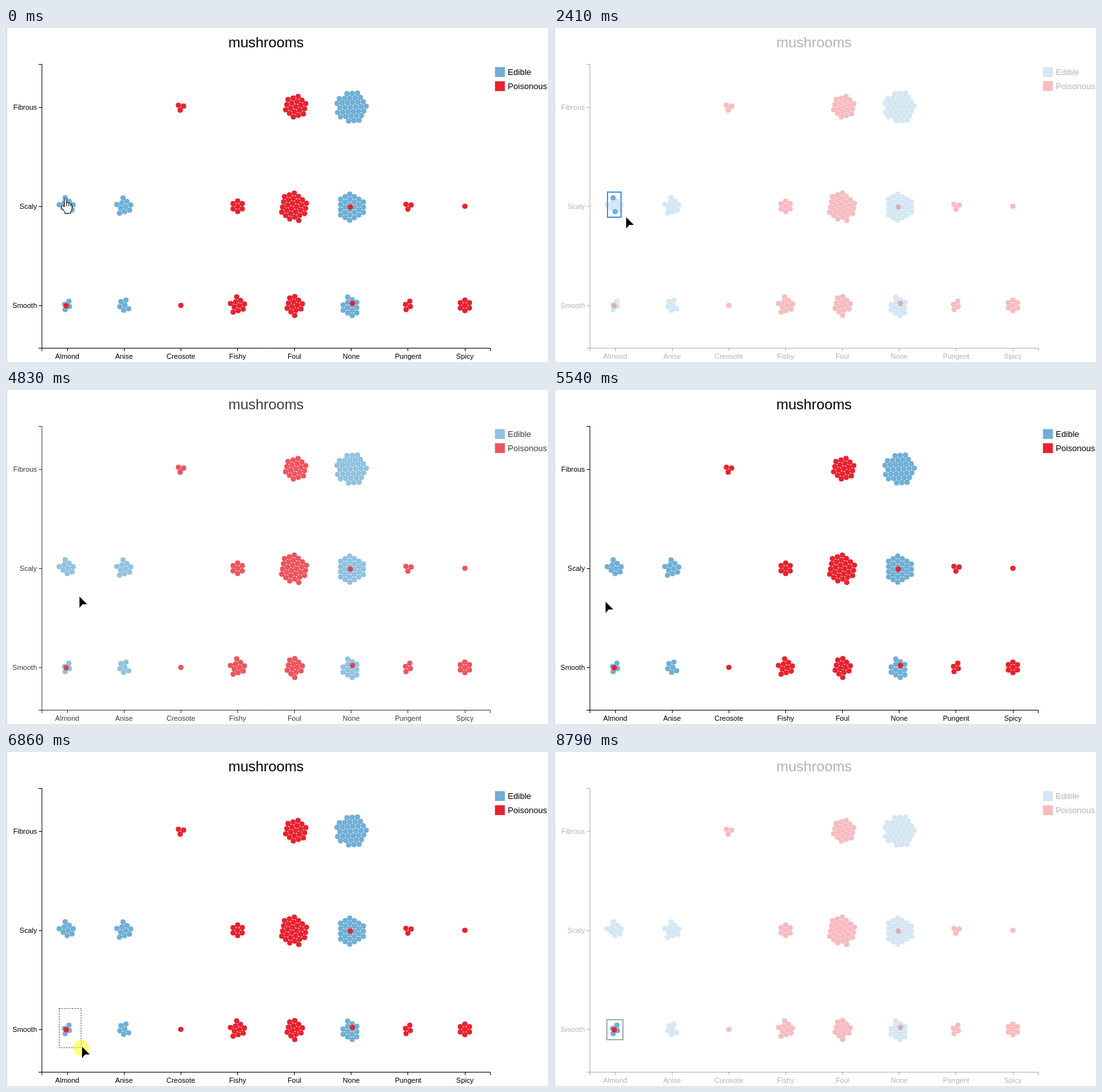
An HTML page with a canvas for the animation above (9270 ms loop, 841x519 px).

```html
<!DOCTYPE html>
<html lang="en">
<head>
<meta charset="utf-8">
<title>mushrooms</title>
<style>
html, body { margin: 0; width: 100%; height: 100%; overflow: hidden; background: #fff; }
canvas { display: block; }
</style>
</head>
<body>
<canvas id="stage" width="841" height="519"></canvas>
<script>
const c = document.getElementById('stage').getContext('2d');
const LOOP = 9270, STEP = 77, GAP = 8.15, PAD = 9, BLUE = '#70afd6', RED = '#e8222e';
const odors = ['Almond', 'Anise', 'Creosote', 'Fishy', 'Foul', 'None', 'Pungent', 'Spicy'];
const surfaces = ['Fibrous', 'Scaly', 'Smooth'];
const colX = i => 95 + 88.15 * i, rowY = i => 123 + 154 * i;
const dots = [];

// A tilted hexagonal lattice through (ox, oy), cut to the n points nearest the cell's centre.
function cluster(odor, surface, color, n = 1, ox = 0, oy = 0, tilt = 0) {
  const x0 = colX(odors.indexOf(odor)), y0 = rowY(surfaces.indexOf(surface));
  const a = tilt * Math.PI / 180, b = a + Math.PI / 3, points = [];
  for (let i = -6; i <= 6; i++)
    for (let j = -6; j <= 6; j++) {
      const x = ox + GAP * (i * Math.cos(a) + j * Math.cos(b));
      const y = oy + GAP * (i * Math.sin(a) + j * Math.sin(b));
      points.push({ x: x0 + x, y: y0 + y, color, d: x * x + .85 * y * y });
    }
  const found = points.sort((p, q) => p.d - q.d).slice(0, n);
  dots.push(...found);
  return found;
}

cluster('Creosote', 'Fibrous', RED, 3, -3.8, -3, 10);
cluster('Foul', 'Fibrous', RED, 19, 1.9, -.7, -17);
cluster('None', 'Fibrous', BLUE, 34, -1.3, 0, -3.5);

const scalyAlmond = cluster('Almond', 'Scaly', BLUE, 9, 1.4, .3, -19);
cluster('Anise', 'Scaly', BLUE, 10, 2.6, .5, -17);
cluster('Fishy', 'Scaly', RED, 7, 0, 0, 30);
cluster('Foul', 'Scaly', RED, 28, 3.2, .8, -20);
cluster('None', 'Scaly', BLUE, 27, -2.4, -2.7, 30);
cluster('None', 'Scaly', RED, 1, -9.6, 1.3);
cluster('Pungent', 'Scaly', RED, 3, -3.4, -3, 8);
cluster('Spicy', 'Scaly', RED);

const smoothAlmond = [
  ...cluster('Almond', 'Smooth', BLUE, 4, -4, -1.5, 24),
  ...cluster('Almond', 'Smooth', RED, 1, 2.5, -6.4)
];
cluster('Anise', 'Smooth', BLUE, 6, 1.2, -.3, -17);
cluster('Creosote', 'Smooth', RED);
cluster('Fishy', 'Smooth', RED, 10, 2.6, .3, -17);
cluster('Foul', 'Smooth', RED, 13, -3.5, 2.2, -16);
cluster('None', 'Smooth', BLUE, 13, 1.5, -.6, 30);
cluster('None', 'Smooth', RED, 1, -6.3, 11.2);
cluster('Pungent', 'Smooth', RED, 4, -4, -1.5, 24);
cluster('Spicy', 'Smooth', RED, 7, 0, 0, 30);

// Dots clicked one after another: the top, bottom and rightmost.
const most = rank => scalyAlmond.reduce((p, q) => rank(q) > rank(p) ? q : p);
const clicked = [most(p => -p.y), most(p => p.y), most(p => p.x)];

// Pointer moves: [start, end, x, y]
const moves = [
  [80, 80, 90, 263], [700, 860, 87, 274], [1330, 1710, 85, 288], [2020, 2410, 112, 294],
  [2560, 3120, 105, 274], [3510, 3820, 122, 332], [4360, 4520, 114, 321], [5070, 5540, 80, 329],
  [5620, 5930, 72, 350], [6010, 6330, 84, 398], [6410, 6860, 118, 458], [7560, 7800, 118, 463],
  [8350, 8790, 741, 489]
];
const between = (t, a, b) => t >= a && t < b;

// Progress in even steps; the first step is taken at the start.
function progress(t, start, end) {
  if (t < start) return 0;
  if (t >= end) return 1;
  const n = Math.round((end - start) / STEP);
  return (Math.floor((t - start) / (end - start) * n) + 1) / (n + 1);
}

function pointer(t) {
  let x = 92, y = 265;
  for (const [start, end, toX, toY] of moves) {
    const u = progress(t, start, end);
    x += (toX - x) * u;
    y += (toY - y) * u;
  }
  return [x, y];
}

function opacity(t) {
  return t < 7950 ? 1 - .7 * (progress(t, 630, 1010) - progress(t, 4750, 4900)) : .3;
}

function selection(t) {
  if (t >= 7950) return smoothAlmond;
  return between(t, 630, 4750) ? clicked.slice(0, t < 2020 ? 1 : t < 3510 ? 2 : 3) : [];
}

function disc(x, y, r, color) {
  c.fillStyle = color;
  c.beginPath();
  c.arc(x, y, r, 0, 7);
  c.fill();
}
const dot = d => disc(d.x, d.y, 4.1, d.color);

function text(s, x, y, size, align) {
  c.font = size + 'px "Liberation Sans", Arial, sans-serif';
  c.textAlign = align;
  c.fillStyle = '#000';
  c.fillText(s, x, y);
}

function chart() {
  text('mushrooms', 403.5, 30, 22.4, 'center');
  [['Edible', BLUE], ['Poisonous', RED]].forEach(([name, color], i) => {
    c.fillStyle = color;
    c.fillRect(758.7, 60.7 + 22 * i, 15.3, 15.3);
    text(name, 778.5, 73 + 22 * i, 13.1, 'left');
  });
  const axisX = 55.8, axisY = 497.5;
  c.strokeStyle = '#000';
  c.lineWidth = 1;
  c.beginPath();
  c.moveTo(50.5, 56.5); c.lineTo(axisX, 56.5); c.lineTo(axisX, axisY); c.lineTo(50.5, axisY);
  c.moveTo(axisX, 502); c.lineTo(axisX, axisY); c.lineTo(751.5, axisY); c.lineTo(751.5, 502);
  odors.forEach((s, i) => {
    const x = Math.floor(colX(i)) + .5;
    c.moveTo(x, axisY); c.lineTo(x, 502);
    text(s, colX(i), 514, 11, 'center');
  });
  surfaces.forEach((s, i) => {
    const y = rowY(i);
    c.moveTo(51, y + .5); c.lineTo(axisX, y + .5);
    text(s, 48, y + 4, 11, 'right');
  });
  c.stroke();
  dots.forEach(dot);
}

function outline(chosen, color) {
  const xs = chosen.map(d => d.x), ys = chosen.map(d => d.y);
  const x = Math.round(Math.min(...xs)) - PAD, y = Math.round(Math.min(...ys)) - PAD;
  c.strokeStyle = color;
  c.lineWidth = 2;
  c.strokeRect(x, y, Math.round(Math.max(...xs)) + PAD - x, Math.round(Math.max(...ys)) + PAD - y);
}

const arrow = new Path2D('M0 0V17.5L4.8 12H12Z');
const hand = new Path2D('M-1.5 12V1.5Q-1.5 0 .2 0T2 1.5V7Q2.5 5.5 4 6T5.5 8Q6 6.5 7.5 7T8.5 9Q10.5 8.5 10.5 11V15Q10.5 18 8.5 20V23H-1V20.5L-6 14Q-7 11.5-5 11Q-3.5 11-1.5 13Z');
const knuckles = new Path2D('M2 7V12M5.5 8V12M8.5 9V12');

function drawPointer(x, y, isHand) {
  c.save();
  c.translate(x, y);
  c.lineWidth = 1;
  c.strokeStyle = '#000';
  c.fillStyle = isHand ? '#fff' : '#000';
  c.fill(isHand ? hand : arrow);
  if (isHand) {
    c.stroke(hand);
    c.stroke(knuckles);
  }
  c.restore();
}

function draw(now) {
  const t = now % LOOP, [x, y] = pointer(t), chosen = selection(t);
  c.fillStyle = '#fff';
  c.fillRect(0, 0, 841, 519);
  c.fillStyle = '#e0e0e0';
  c.fillRect(0, 0, 2, 519);
  c.globalAlpha = opacity(t);
  chart();
  c.globalAlpha = 1;
  chosen.forEach(dot);
  if (chosen.length) outline(chosen, t >= 7950 ? '#a3afb9' : t < 2020 ? '#62a8e8' : '#4698e8');

  if (between(t, 6410, 7950)) {
    c.strokeStyle = '#444';
    c.lineWidth = 1;
    c.setLineDash([2, 2]);
    c.strokeRect(82.5, 398.5, Math.round(x) - 84, Math.min(61, Math.round(y) - 397));
    c.setLineDash([]);
  }
  if (between(t, 6410, 7560)) disc(x - 1.5, y + 1.5, 12.5, 'rgba(255, 255, 0, .5)');
  const isHand = t < 860 || between(t, 1710, 2020) || between(t, 3120, 3510);
  if (t < 8790) drawPointer(x, y, isHand);
  requestAnimationFrame(draw);
}
requestAnimationFrame(draw);
</script>
</body>
</html>
```
